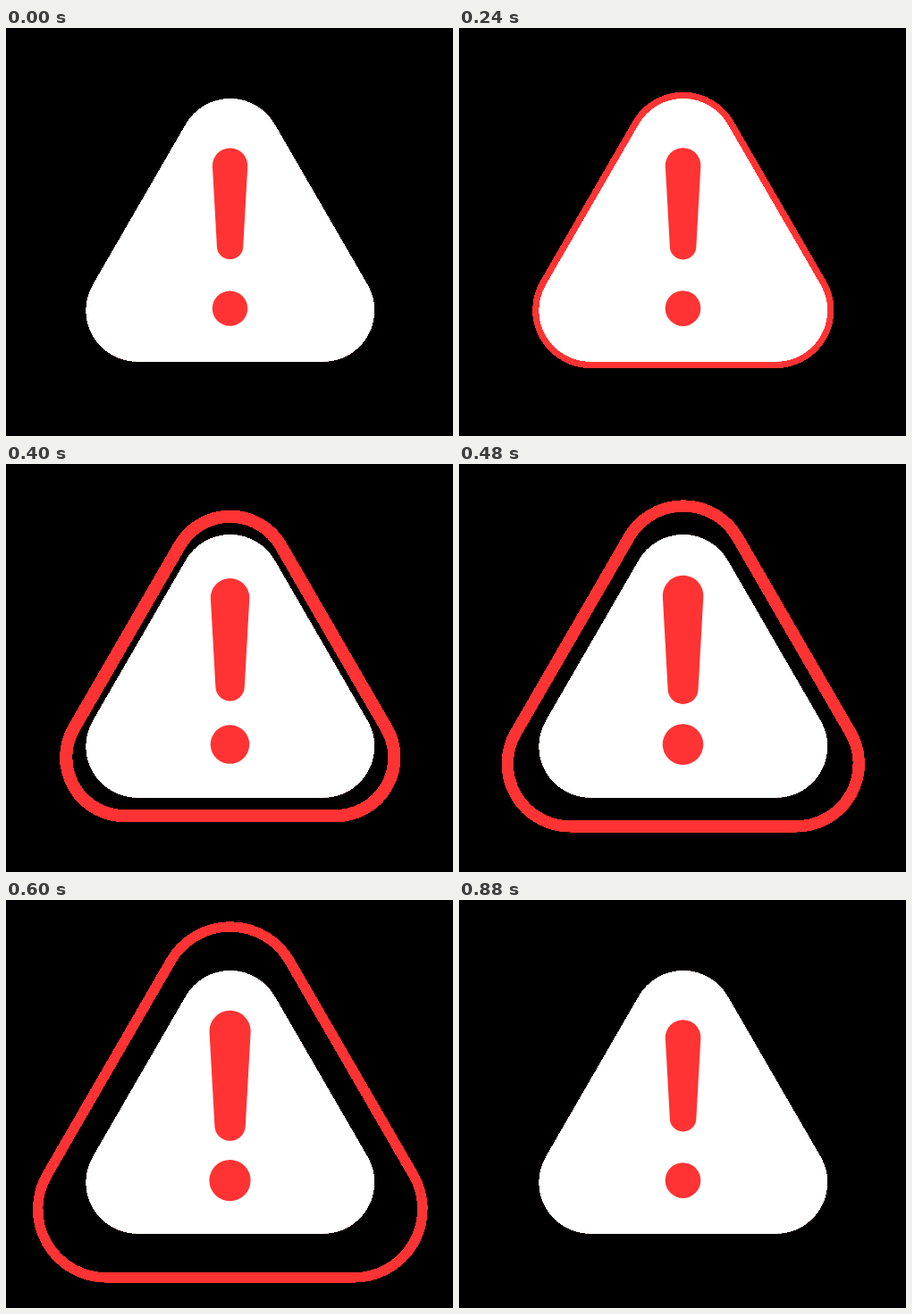
Animation of 500 by 457 pixels, one loop 920 ms. Source, as an HTML page:

```html
<!DOCTYPE html>
<html lang="en">
<head>
<meta charset="utf-8">
<title>Warning pulse</title>
<style>
  html, body { margin: 0; width: 100%; height: 100%; overflow: hidden; background: #000; }
  svg { display: block; }
  .hard { shape-rendering: crispEdges; }
</style>
</head>
<body>
<svg width="500" height="457" viewBox="0 0 500 457">
  <defs>
    <path id="triangle" d="M-49.7 -118.5 A57.4 57.4 0 0 1 49.7 -118.5 L153.5 61.1
      A57.4 57.4 0 0 1 103.8 147.2 H-103.8 A57.4 57.4 0 0 1 -153.5 61.1 Z"/>
  </defs>
  <g class="hard" transform="translate(250.8 226.4)">
    <use id="ring" href="#triangle" fill="none" stroke="#f33"/>
    <use href="#triangle" fill="#fcc" transform="scale(1.002)"/>
    <use href="#triangle" fill="#fff"/>
  </g>
  <g fill="#f33">
    <g transform="translate(250.6 196.8)">
      <path class="mark" d="M-19.7 -42.5 A19.7 19.7 0 0 1 19.7 -42.5 L14.7 47.6 A14.7 14.7 0 0 1 -14.7 47.6 Z"/>
    </g>
    <g transform="translate(250.5 314.1)">
      <circle class="mark" r="19.7"/>
    </g>
  </g>
</svg>
<script>
const LOOP = 920, STEP = 40, RING_END = 720, MARK_START = 200;
const { PI, sin, cos, floor } = Math;
const ring = document.getElementById('ring');
const marks = document.querySelectorAll('.mark');

const setScale = (el, s) => el.setAttribute('transform', `scale(${s})`);

// The ring grows with a sine ease while its stroke thins steadily.
function drawRing(t) {
  const visible = t <= RING_END;
  ring.setAttribute('visibility', visible ? 'visible' : 'hidden');
  if (!visible) return;
  setScale(ring, 1.199 - 0.295 * cos(PI * t / LOOP));
  ring.setAttribute('stroke-width', 20.3 - 0.0195 * t);
}

function drawMarks(t) {
  const phase = Math.max(0, t - MARK_START) / (LOOP - MARK_START);
  const s = 1 + 0.178 * sin(PI * phase) ** 2;
  marks.forEach(el => setScale(el, s));
}

function draw(t) {
  drawRing(t);
  drawMarks(t);
}

let start;
function tick(now) {
  start ??= now;
  draw(floor((now - start) % LOOP / STEP) * STEP);
  requestAnimationFrame(tick);
}
draw(0);
requestAnimationFrame(tick);
</script>
</body>
</html>
```
